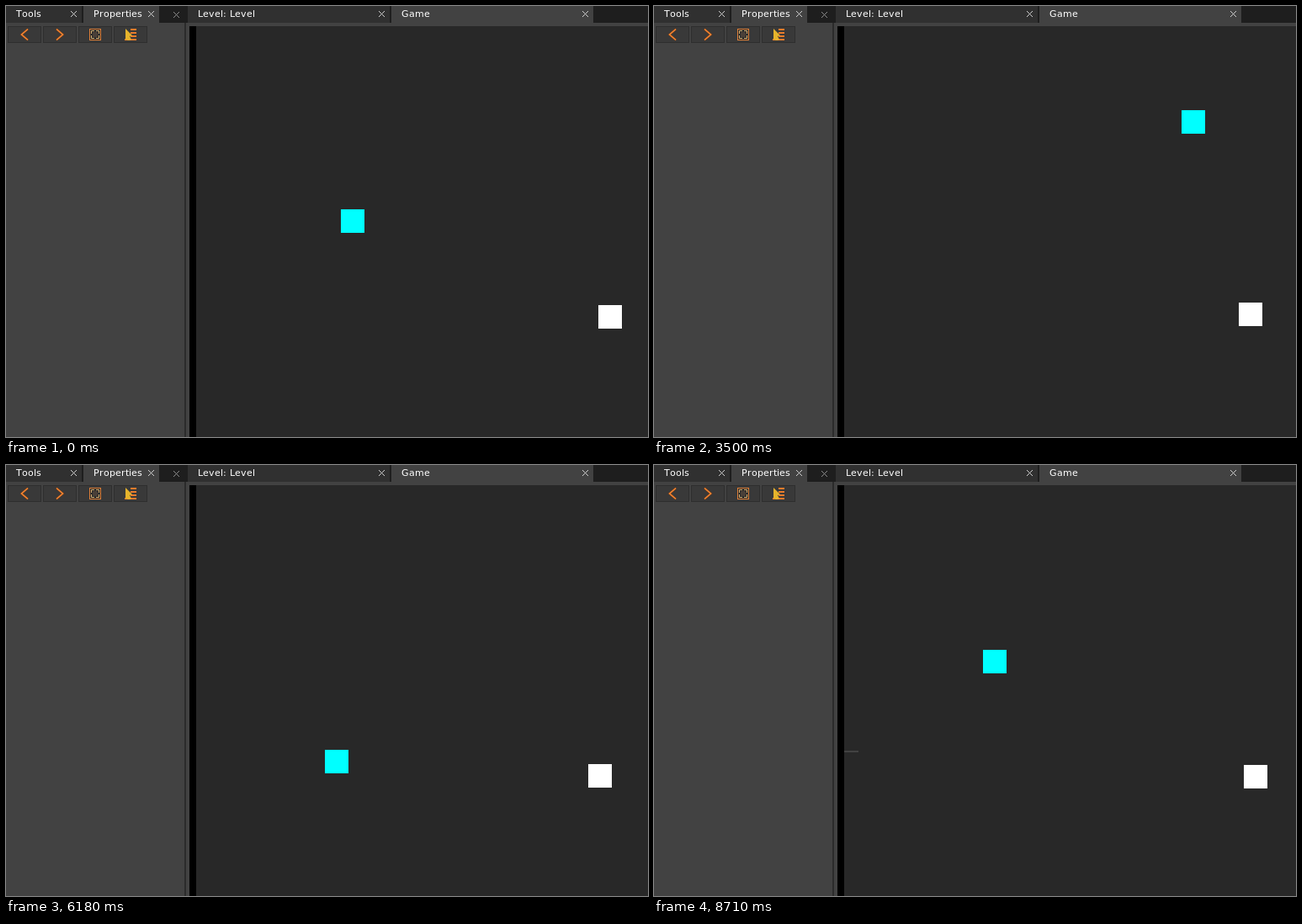
Write an HTML page with a canvas that moves like this. It is 763 px wide and 513 px high and loops after 9.17 s.

```html
<!DOCTYPE html>
<html lang="en">
<head>
<meta charset="utf-8">
<title>Editor</title>
<style>
html, body { margin: 0; width: 100%; height: 100%; overflow: hidden; background: #282828; }
canvas { display: block; }
</style>
</head>
<body>
<canvas id="stage" width="763" height="513"></canvas>
<script>
const ctx = document.getElementById('stage').getContext('2d');
const LOOP = 9170;
const BEGIN = 470, MIDDLE = 4300;
const LAST_STEP = 104;
const SIZE = 28;
const LEFT = 212; // half a square beyond the pane's edge

// Turning points: [step, x, y]
const cyan = path([
  [-1, 398, 242], [7, 270, 58], [12, LEFT, 186], [17, LEFT, 295], [30, LEFT, 200],
  [38, 627, 124], [50, 316, 300], [58, 626, 216], [62, 690, 129], [72, 379, 339],
  [76, LEFT, 310], [86, LEFT, 102], [91, 219, 256], [97, 500, 300], [LAST_STEP, 391, 220]
], 0);
const white = path([
  [-1, 704, 356], [12, 697, 362], [38, 695, 353], [58, 703, 352],
  [72, 692, 356], [91, 704, 369], [LAST_STEP, 701, 357]
], 6);

// Curve through the points without overshoot; sway adds a drift between them
function path(pts, sway) {
  const slope = (i, a) => (pts[i + 1][a] - pts[i][a]) / (pts[i + 1][0] - pts[i][0]);
  const tangent = (i, a) => {
    if (i === 0) return slope(0, a);
    if (i === pts.length - 1) return slope(i - 1, a);
    const p = slope(i - 1, a), q = slope(i, a);
    return p * q > 0 ? 2 * p * q / (p + q) : 0;
  };
  return k => {
    let i = 0;
    while (i < pts.length - 2 && k >= pts[i + 1][0]) i++;
    const h = pts[i + 1][0] - pts[i][0];
    const u = (k - pts[i][0]) / h;
    const drift = sway * Math.sin(u * 2 * Math.PI);
    return [1, 2].map(a => {
      const v = pts[i][a], c = pts[i + 1][a] - v;
      const m = tangent(i, a) * h, n = tangent(i + 1, a) * h;
      return Math.round(v + u * (m + u * (3 * c - 2 * m - n + u * (m + n - 2 * c))) - drift);
    });
  };
}

// The pace quickens slightly in the second half
function stepAt(ms) {
  const t = ms + 10;
  if (t < BEGIN) return -1;
  const k = t < MIDDLE ? (t - BEGIN) / 79.8 : 48 + (t - MIDDLE) / 78.75;
  return Math.min(LAST_STEP, Math.floor(k));
}

function box(color, x, y, w, h) {
  ctx.fillStyle = color;
  ctx.fillRect(x, y, w, h);
}

function line(color, width, ...pts) {
  ctx.strokeStyle = color;
  ctx.lineWidth = width;
  ctx.beginPath();
  pts.forEach(([x, y]) => ctx.lineTo(x, y));
  ctx.stroke();
}

// Whole-pixel advances, as in the editor's hinted text
function label(text, x) {
  ctx.fillStyle = '#fff';
  for (const ch of text) {
    ctx.fillText(ch, x, 13);
    x += Math.round(ctx.measureText(ch).width + 0.02);
  }
}

function cross(x, y, color) {
  for (let i = -3; i <= 3; i++) {
    box(color, x + i, y + i, 1, 1);
    box(color, x + i, y - i, 1, 1);
  }
}

function tab(x, w, color, text) {
  box(color, x, 0, w, 20);
  label(text, x + 12);
  cross(x + w - 10, 9, '#d0d0d0');
}

function tabs() {
  box('#1e1e1e', 0, 0, 763, 20);
  ctx.font = '11px "DejaVu Sans", sans-serif';
  tab(0, 90, '#303030', 'Tools');
  tab(92, 90, '#424242', 'Properties');
  tab(216, 240, '#303030', 'Level: Level');
  tab(458, 240, '#424242', 'Game');
  cross(202, 10, '#8c8c8c');
}

function chevron(x, dir) {
  const pts = [[x - 4 * dir, 27.5], [x + 3.5 * dir, 34], [x - 4 * dir, 40.5]];
  line('#6b3c1c', 2.6, ...pts);
  line('#f58634', 1.6, ...pts);
}

function fitIcon() {
  box('#e08038', 99, 27, 14, 14);
  box('#2c2c2c', 100, 28, 12, 12);
  box('#4a4038', 103, 31, 6, 6);
  for (const sx of [-1, 1]) {
    for (const sy of [-1, 1]) {
      const x = 106 + sx * 4.5, y = 34 + sy * 4.5;
      line('#d8b070', 1, [x, y - sy * 3.5], [x, y], [x - sx * 3.5, y]);
    }
  }
}

function pickIcon() {
  for (let i = 0; i < 4; i++) {
    const x = i < 3 ? 148 : 141;
    box('#e87c2c', x, 27 + 4 * i, 155 - x, 2);
  }
  ctx.fillStyle = '#e6b42c';
  ctx.beginPath();
  [[142, 27], [150, 35], [147, 36], [149, 40], [146, 41], [142, 40]]
    .forEach(([x, y]) => ctx.lineTo(x, y));
  ctx.fill();
}

function panel() {
  box('#424242', 0, 20, 763, 493);
  box('#2b2b2b', 212, 20, 2, 493);
  for (let x = 2; x < 130; x += 42) {
    box('#2e2e2e', x, 24, 40, 20);
    box('#393939', x + 1, 25, 38, 18);
  }
  chevron(22, -1);
  chevron(64, 1);
  fitIcon();
  pickIcon();
}

function game(k) {
  box('#000', 218, 24, 8, 489);
  box('#282828', 226, 24, 537, 489);
  ctx.save();
  ctx.beginPath();
  ctx.rect(226, 24, 537, 489);
  ctx.clip();
  // A scrap of the square's edge stays behind late in the loop
  if (k > 76) box('#424242', 226, 340, 17, 2);
  box('#0ff', ...cyan(k), SIZE, SIZE);
  box('#fff', ...white(k), SIZE, SIZE);
  ctx.restore();
}

function draw() {
  panel();
  tabs();
  game(stepAt((performance.now() - start) % LOOP));
  requestAnimationFrame(draw);
}

const start = performance.now();
draw();
</script>
</body>
</html>
```
